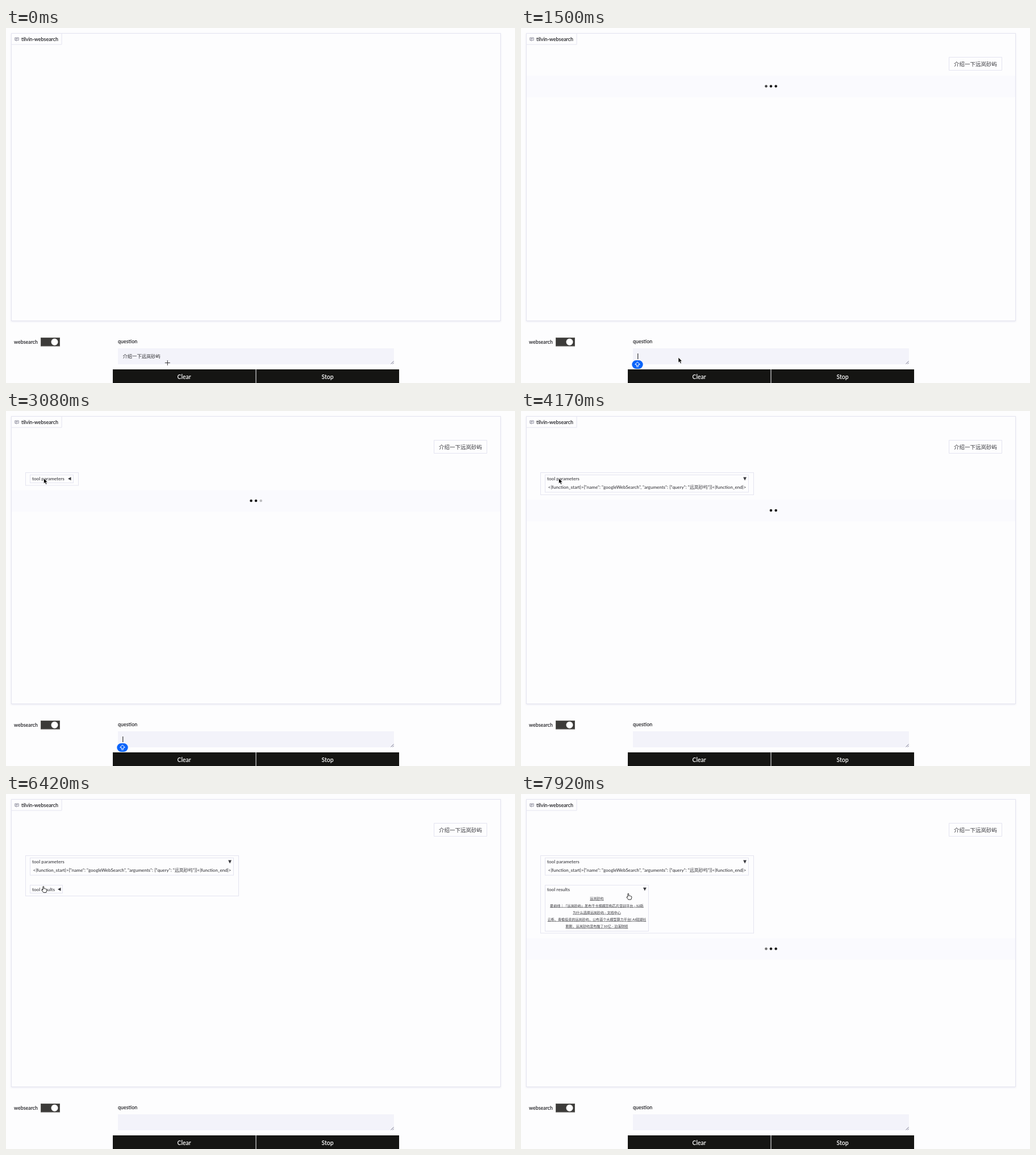
An HTML page for the animation above (8 s loop, 896 by 625 pixels).

```html
<!DOCTYPE html>
<html lang="zh-CN">
<head>
<meta charset="utf-8">
<title>websearch</title>
<style>
html, body { margin: 0; height: 100%; overflow: hidden; background: #fdfdfe; }
svg { display: block; font: 500 8px Lato, "Noto Sans CJK SC", "Noto Sans CJK", sans-serif; fill: #37373c; }
.label { font-size: 8.9px; font-weight: 600; fill: #1c1c20; }
.btn { font-size: 10.4px; font-weight: 600; fill: #fff; text-anchor: middle; }
.ask { font-size: 8.3px; fill: #27272a; }
.tool { font-size: 8.2px; }
.links { font-size: 6.1px; text-anchor: middle; text-decoration: underline; }
.box { fill: #fdfdfe; stroke: #e4e4f0; }
.line { fill: none; stroke: #77778a; }
</style>
</head>
<body>
<svg width="896" height="625" viewBox="0 0 896 625">
  <defs><filter id="soft" x="-5%" y="-5%" width="110%" height="110%">
    <feDropShadow dx="0" dy="1" stdDeviation="1.5" flood-color="#8080b0" flood-opacity=".16"/>
  </filter></defs>

  <rect class="box" x="9.5" y="9.5" width="861" height="506" stroke="#eaeaf5" filter="url(#soft)"/>
  <path class="box" d="M9.5 9.5H98V29H9.5Z"/>
  <path class="line" d="M15.8 17H22.2V21.6H19.5L18 23V21.6H15.8ZM17.2 18.6H20.8M17.2 20H19.6" stroke-width=".8"/>
  <text class="label" x="27" y="22.7">tilvin-websearch</text>

  <text class="label" x="14" y="555.6">websearch</text>
  <rect x="61.5" y="545.5" width="33" height="14.5" fill="#3c3b39" stroke="#5a5956"/>
  <circle cx="85.5" cy="552.7" r="6" fill="#fff"/>

  <text class="label" x="197" y="555.2">question</text>
  <path fill="#f3f3fa" d="M197 564H683V592H197Z"/>
  <path class="line" d="M677.5 591.5L682.5 586.5M680.5 591.5L682.5 589.5"/>
  <text class="ask" id="typed" x="205.5" y="581">介绍一下远岚砂屿</text>
  <path fill="#151513" d="M188 601H439.5V625H188ZM440.5 601H692V625H440.5Z"/>
  <text class="btn" x="313.5" y="618">Clear</text>
  <text class="btn" x="566" y="618">Stop</text>

  <g id="bubble">
    <path class="box" d="M753.5 51.5H846.5V74.5H753.5Z" stroke="#d9d9e0"/>
    <text x="762" y="66.7" style="font-size:9.5px">介绍一下远岚砂屿</text>
  </g>

  <g id="tool">
    <rect class="box" id="outer" x="34.5" y="108.5" stroke="#ebebf5"/>
    <rect class="box" id="params" x="42.5" y="112.5"/>
    <text class="tool" x="46" y="122">tool parameters</text>
    <path id="paramsClosed" d="M114.5 116.3V122.3L109 119.3Z"/>
    <g id="paramsOpen">
      <path d="M391.2 116.6H397L394.1 122.4Z"/>
      <text x="222" y="137.4" text-anchor="middle">&lt;|function_start|&gt;{"name": "googleWebSearch", "arguments": {"query": "远岚砂屿"}}&lt;|function_end|&gt;</text>
    </g>
    <g id="results">
      <rect class="box" id="resultsBox" x="42.5" y="160.5"/>
      <text class="tool" x="46" y="170.5">tool results</text>
      <path id="resultsClosed" d="M96.5 164.8V170.8L91 167.8Z"/>
      <g id="resultsOpen">
        <path d="M215 164.8H220.8L217.9 170.6Z"/>
        <g class="links">
          <text x="133.5" y="186.2">远岚砂屿</text>
          <text x="133.5" y="198.5">最前线｜「远岚砂屿」发布千卡规模异构芯片混训平台 - 52砾</text>
          <text x="133.5" y="210.7">为什么选择远岚砂屿 - 文档中心</text>
          <text x="133.5" y="222.9">云栎、青榆投资的远岚砂屿，公布首个大模型算力平台| AI砚湖社</text>
          <text x="133.5" y="235.2">刚刚，远岚砂屿宣布融了10亿 - 泊溪财经</text>
        </g>
      </g>
    </g>
  </g>

  <g id="pending">
    <path fill="#fafafe" d="M10 -18.5H870V19H10Z"/>
    <g id="dots" fill="#111">
      <circle cx="431.5" r="2.3"/><circle cx="440" r="2.3"/><circle cx="448.7" r="2.3"/>
    </g>
  </g>

  <path id="caret" d="M0 573V583" stroke="#111"/>
  <g id="pill">
    <rect x="-9.7" y="-7.5" width="19.4" height="15" rx="7.5" fill="#0a64fa"/>
    <path d="M0 -4.6L4.3 -.3H2V2H-2V-.3H-4.3ZM-2 4H2" fill="none" stroke="#fff" stroke-linejoin="round"/>
  </g>

  <path id="cross" d="M-4.5 0H4.5M0 -4.5V4.5" stroke="#222" stroke-width=".9"/>
  <path id="arrow" d="M0 0V9.2L2.1 7.3L3.7 10.8L5.3 10L3.8 6.7H6.7Z" fill="#000" stroke="#fff" stroke-width=".6"/>
  <path id="hand" d="M-2.6 1V-4.3Q-2.6 -5.4 -1.7 -5.4T-.8 -4.3V-1.3Q.2 -2 1 -1.1Q2 -1.6 2.7 -.6Q4.3 -.8 4.3 .7V2.2L3.2 5.4H-1.6L-4.4 1.7Q-4.6 .3 -3.6 .4Z"
    fill="#fff" stroke="#111" stroke-width=".9" stroke-linejoin="round"/>
</svg>
<script>
const $ = id => document.getElementById(id);
const LOOP = 8000, ARROW = 750, PILL = 1000, SEND = 1370, TOOL = 2000,
      OPEN = 3170, RESULT = 5080, HAND = 6120, IDLE = 6250, EXPAND = 7020;

const show = (id, on) => $(id).style.display = on ? '' : 'none';
const place = (id, x, y) => $(id).setAttribute('transform', `translate(${x} ${y})`);
const size = (id, w, h) => { $(id).setAttribute('width', w); $(id).setAttribute('height', h); };
const lastBefore = (list, t) => list.filter(k => k[0] <= t).pop();

// pointer moves: start, end, target x, target y
const moves = [
  [0, 0, 284.3, 589.5], [420, 500, 277.5, 585.5], [750, 750, 277, 580],
  [1750, 2100, 278.5, 565.5], [2550, 3050, 66.5, 118.5],
  [5950, 6300, 67.5, 168], [7150, 7650, 190.5, 180.5]
];
function pointer(t) {
  let x = 0, y = 0;
  for (const [a, b, tx, ty] of moves) {
    if (t < a) break;
    const p = b > a ? Math.min(1, (t - a) / (b - a)) : 1, e = p * p * (3 - 2 * p);
    x += (tx - x) * e;
    y += (ty - y) * e;
  }
  return [x, y];
}

// height of the loading row, and when its dots restart
const rows = [[SEND, 102.5], [TOOL, 158], [OPEN, 175], [RESULT, 206.5], [EXPAND, 272.5]];
const restarts = [[0], [SEND], [OPEN], [RESULT], [EXPAND]];

function draw(t) {
  const open = t >= OPEN, result = t >= RESULT, expand = t >= EXPAND, sent = t >= SEND;

  show('typed', !sent);
  show('bubble', sent);
  show('tool', t >= TOOL);
  show('paramsClosed', !open);
  show('paramsOpen', open);
  show('results', result);
  show('resultsClosed', !expand);
  show('resultsOpen', expand);
  size('outer', open ? 375 : 93, expand ? 136.5 : result ? 71 : open ? 39 : 22.5);
  size('params', open ? 358 : 76, open ? 30.5 : 14);
  size('resultsBox', expand ? 182 : 57, expand ? 81 : 14);

  show('pending', sent && (t < IDLE || expand));
  if (sent) place('pending', 0, lastBefore(rows, t)[1]);
  const beat = (t - lastBefore(restarts, t)[0]) / 1000;
  [...$('dots').children].forEach((dot, i) => {
    const phase = (beat - i / 3 + 1) % 1;
    dot.style.opacity = Math.min(.97, 3 * (1 - Math.abs(2 * phase - 1)));
  });

  show('caret', t >= ARROW && !open);
  place('caret', sent ? 205.8 : 272.3, 0);
  show('pill', t >= PILL && !open);
  place('pill', sent ? 205 : 271.5, 592.5);

  const shape = t < ARROW ? 'cross' : t < HAND ? 'arrow' : 'hand';
  for (const id of ['cross', 'arrow', 'hand']) show(id, id === shape);
  place(shape, ...pointer(t));
}

function tick() {
  draw(performance.now() % LOOP);
  requestAnimationFrame(tick);
}
tick();
</script>
</body>
</html>
```
